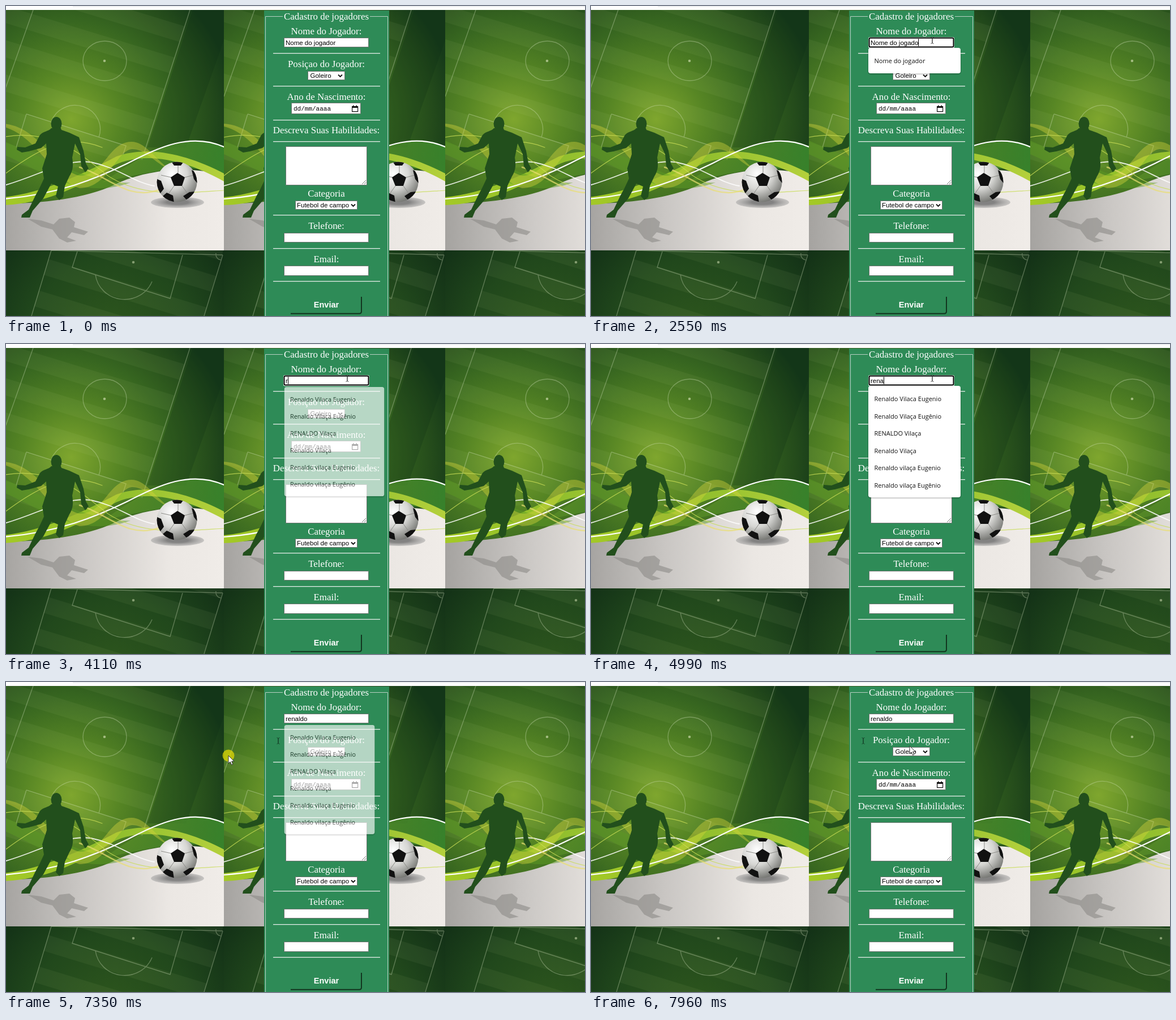
Animation of 1023 by 548 pixels, one loop 8000 ms. Source, as an HTML page:

```html
<!DOCTYPE html>
<html lang="pt">
<head>
<meta charset="utf-8">
<style>
html, body { margin: 0; width: 100%; height: 100%; overflow: hidden; background: #fff }
svg { display: block }
text { white-space: pre }
.serif { font: 16.9px "Liberation Serif", "Times New Roman", serif; fill: #fff; text-anchor: middle }
.sans { font: 11.5px "Liberation Sans", Arial, sans-serif }
.menu { font: 11px "Open Sans", "Noto Sans", sans-serif; fill: #111 }
.box { fill: #fff; stroke: #6f7672 }
.chalk { fill: none; stroke: #dfeccb; stroke-opacity: .32; stroke-width: 1.4 }
</style>
</head>
<body>
<svg id="stage" width="1023" height="548" viewBox="0 0 1023 548">
<defs>
  <radialGradient id="grass" gradientUnits="userSpaceOnUse" cx="115" cy="200" r="290">
    <stop stop-color="#7fa62e"/><stop offset=".3" stop-color="#568524"/>
    <stop offset=".6" stop-color="#376620"/><stop offset=".85" stop-color="#244b1b"/><stop offset="1" stop-color="#163a19"/>
  </radialGradient>
  <radialGradient id="night" gradientUnits="userSpaceOnUse" cx="185" cy="590" r="260">
    <stop stop-color="#2f581d"/><stop offset=".55" stop-color="#21481c"/><stop offset="1" stop-color="#112e16"/>
  </radialGradient>
  <linearGradient id="floor">
    <stop stop-color="#a5a3a0"/><stop offset=".35" stop-color="#c9c6c3"/><stop offset=".75" stop-color="#ebe7e3"/><stop offset="1" stop-color="#f0ece8"/>
  </linearGradient>
  <linearGradient id="lime">
    <stop stop-color="#a4c926"/><stop offset=".5" stop-color="#8fbe2c"/><stop offset="1" stop-color="#b4d03c"/>
  </linearGradient>
  <linearGradient id="leaf">
    <stop stop-color="#6da52c" stop-opacity=".3"/><stop offset="1" stop-color="#37812b"/>
  </linearGradient>
  <radialGradient id="shine" cx=".38" cy=".3" r=".75">
    <stop stop-color="#fff"/><stop offset=".5" stop-color="#d6d6d3"/><stop offset="1" stop-color="#6f706c"/>
  </radialGradient>
  <radialGradient id="shade"><stop offset=".4" stop-color="#777" stop-opacity=".9"/><stop offset="1" stop-color="#999" stop-opacity=".45"/></radialGradient>
  <pattern id="mow" width="60" height="58" patternUnits="userSpaceOnUse" patternTransform="rotate(17)">
    <rect width="60" height="29" fill="#d8f0a0" opacity=".055"/>
  </pattern>
  <clipPath id="round"><circle cx="302" cy="311" r="35.5"/></clipPath>

  <symbol id="tile" viewBox="-6 7 391 541">
    <path fill="url(#grass)" d="M-6 7H385V432H-6Z"/>
    <path fill="url(#mow)" d="M-6 7H325L240 272L-6 300Z"/>
    <path fill="#0c2a14" opacity=".22" d="M330 7H385V60L318 250H250Z"/>
    <g class="chalk">
      <path d="M325 7L240 272M48 7L-6 160M36 191L212 247L203 275M36 191L18 250M80 204A44 42 0 0 1 164 232"/>
      <ellipse cx="174.500" cy="97" rx="38.500" ry="35"/>
    </g>
    <circle cx="174" cy="97" r="2.300" fill="#c9d9a8" opacity=".7"/>

    <path fill="url(#floor)" d="M-6 350C80 348 150 338 200 312C260 286 330 285 385 298V432H-6Z"/>
    <path fill="url(#leaf)" d="M170 312C230 272 280 238 340 238C360 238 375 243 385 248V298C330 276 270 290 170 312Z"/>
    <path fill="url(#lime)" d="M-6 352C60 350 120 326 180 288C225 258 300 262 385 310V296C320 262 250 246 195 266C130 300 60 332 -6 338Z"/>
    <path fill="#5d9a25" opacity=".5" d="M-6 262C60 290 130 345 220 312C160 316 80 275 -6 238Z"/>
    <path fill="#d8d53c" opacity=".4" d="M-6 208C60 212 85 290 130 300C175 300 180 240 222 240C245 240 262 268 290 290C260 275 245 252 222 253C195 256 180 322 130 322C85 310 55 228 -6 213Z"/>
    <g fill="none" stroke-linecap="round">
      <path stroke="#fff" stroke-width="2.200" d="M-6 341C90 334 160 305 215 278C270 250 325 223 385 249"/>
      <path stroke="#fff" stroke-width="1.800" opacity=".85" d="M-6 318C60 300 100 270 150 276C200 286 225 312 262 318"/>
      <path stroke="#c9dc55" stroke-width="1.200" opacity=".8" d="M-6 232C80 215 130 260 180 300C240 340 320 330 385 326M-6 300C60 250 110 225 170 250"/>
      <path stroke="#eadf72" stroke-width="2.500" opacity=".7" d="M130 285C180 300 215 345 270 325"/>
    </g>

    <path fill="#8d8b88" opacity=".6" d="M38 376L62 379L84 386L94 376L112 374L122 382L120 391L145 399L138 405L116 400L108 409L124 415L108 418L94 411L82 395L62 390Z"/>
    <g fill="#224f1c">
      <ellipse cx="89" cy="208" rx="9.500" ry="12"/>
      <path d="M80 216C75 222 66 221 60 228L52 243L34 250L20 249L19 254L28 259L40 257L62 251L71 243L72 262L64 287L67 305C61 319 56 328 52 335L40 360L28 369L27 374L42 374L47 362L66 340L80 314L92 319L88 336L94 343L101 338L104 318L112 301C119 290 119 280 117 268L122 243L131 262L133 283L140 294L146 287L141 278L137 256L129 232L112 224L98 219L96 214Z"/>
    </g>

    <ellipse cx="303" cy="347" rx="47" ry="10" fill="url(#shade)"/>
    <circle cx="302" cy="311" r="35.500" fill="url(#shine)"/>
    <g clip-path="url(#round)">
      <path fill="none" stroke="#8b8b87" d="M304 295V280M316 303L331 299M311 318L321 332M297 318L287 332M292 303L274 299"/>
      <path fill="#111" d="M303 295L316 303L311 318L297 318L291 303ZM292 275H314L309 282H297ZM328 290L340 296V316L332 306ZM267 306L274 309L279 323L272 332L264 320ZM284 330L295 335L297 348H284L277 336ZM313 336L324 329L334 328L322 346Z"/>
    </g>

    <path fill="url(#night)" d="M-6 432H385V548H-6Z"/>
    <path fill="url(#mow)" d="M80 432H384L350 548H45Z"/>
    <g class="chalk">
      <path d="M80 432L45 548M383 440L350 548M80 432L383 440M126 434L117 462L290 517L312 440M158 475A52 50 0 0 0 258 487M371 437A10 10 0 0 0 381 449"/>
    </g>
    <circle cx="225" cy="453" r="2.300" fill="#a9bd92" opacity=".7"/>
  </symbol>
</defs>

<rect width="1023" height="548" fill="#fff"/>
<rect x="118" width="905" height="2" fill="#eff1f2"/>
<use href="#tile" x="-6" y="7" width="391" height="541"/>
<use href="#tile" x="385" y="7" width="391" height="541"/>
<use href="#tile" x="776" y="7" width="391" height="541"/>

<rect x="456" y="8" width="221" height="540" fill="#2e8b57"/>
<path fill="none" stroke="#b9cfc3" d="M489 18.500H458.500V548M643 18.500H674.500V548"/>
<g id="labels" class="serif"></g>
<g id="rules" fill="#e3ece7"></g>
<g class="box">
  <path d="M491.500 401.500h149v16h-149zM491.500 459.500h149v17h-149zM533.500 115.500h65v15h-65zM504.500 171.500h122v19h-122zM511.500 344.500h109v15h-109zM494.500 248.500h143v68h-143z"/>
</g>
<g class="sans">
  <text x="537.500" y="127">Goleiro</text>
  <text x="514" y="356">Futebol de campo</text>
</g>
<text x="508" y="185" style="font:11px 'Liberation Mono','DejaVu Sans Mono',monospace">dd/mm/aaaa</text>
<path fill="none" stroke="#111" stroke-width="1.800" d="M587 121.500l3.500 3.500l3.500-3.500M610 350.500l3.500 3.500l3.500-3.500"/>
<path fill="none" stroke="#111" stroke-width="1.200" d="M611.600 177.600h10v9h-10z"/>
<path fill="#111" d="M611 177h11v3h-11zM613 175.500h1.500v2h-1.500zM618.500 175.500h1.500v2h-1.500z"/>
<path stroke="#666" stroke-width=".9" d="M629 315l7-7M633 315l3-3"/>
<path fill="none" stroke="#12351f" stroke-width="2" d="M503 543.800H624Q628 543.800 628 540V514"/>
<text x="566" y="533" text-anchor="middle" fill="#fff" style="font:bold 14.500px 'Liberation Sans',Arial,sans-serif">Enviar</text>

<rect id="ring" x="490" y="55" width="152" height="19.500" rx="3" fill="#fff"/>
<rect id="field" class="box" x="491.500" y="56.500" width="149" height="16"/>
<text id="value" class="sans" x="494" y="69"></text>
<path id="caret" stroke="#000" d="M0 58V71"/>

<g id="popup">
  <rect id="shadow" x="489" y="75" rx="5" fill="#000" opacity=".16"/>
  <rect id="sheet" x="490" y="74" rx="4" fill="#fff"/>
  <rect id="hover" x="490" y="81" width="163" height="31" fill="#e8e8e8"/>
  <g id="items" class="menu"></g>
</g>

<g fill="none" stroke="#111">
  <path id="trace" d="M-2.500-5.500q2.500 0 2.500 2v7q0 2-2.500 2M2.500-5.500q-2.500 0-2.500 2v7q0 2 2.500 2" transform="translate(481 104)" stroke="#0d2a1a" opacity=".7"/>
</g>
<circle id="click" r="10.500" fill="#eee000" opacity=".68"/>
<path id="beam" d="M-2.500-5.500q2.500 0 2.500 2v7q0 2-2.500 2M2.500-5.500q-2.500 0-2.500 2v7q0 2 2.500 2" fill="none" stroke="#222" stroke-width=".8"/>
<path id="arrow" d="M0 0V14L3.200 11L5.400 16.300L7.800 15.300L5.600 10.200H10Z" fill="#fff" stroke="#222" stroke-width=".9"/>
</svg>

<script>
const LOOP = 8000;
const $ = id => document.getElementById(id);
const set = (id, attrs) => { for (const k in attrs) $(id).setAttribute(k, attrs[k]); };
const show = (id, on) => { $(id).style.display = on ? '' : 'none'; };
const within = (t, a, b) => t >= a && t < b;
const clamp = v => Math.max(0, Math.min(1, v));

[['Cadastro de jogadores', 24], ['Nome do Jogador:', 50], ['Posiçao do Jogador:', 108],
 ['Ano de Nascimento:', 166], ['Descreva Suas Habilidades:', 225], ['Categoria', 337],
 ['Telefone:', 394], ['Email:', 453]].forEach(([s, y]) =>
  $('labels').innerHTML += `<text x="566" y="${y}">${s}</text>`);
[83, 141, 201, 239, 369, 428, 486].forEach(y =>
  $('rules').innerHTML += `<rect x="472" y="${y}" width="189" height="1.300"/>`);

const PROMPT = 'Nome do jogador', TYPED = 'renaldo';
const NAMES = ['Renaldo Vilaca Eugenio', 'Renaldo Vilaça Eugênio', 'RENALDO Vilaça',
  'Renaldo Vilaça', 'Renaldo vilaça Eugenio', 'Renaldo vilaça Eugênio'];
const KEYS = [4040, 4170, 4590, 4990, 5250, 5520, 6060];

// Pointer moves: start, end, number of steps, target x and y
const MOVES = [
  [400, 670, 5, 741, 228], [860, 1150, 5, 603, 61], [6540, 6680, 3, 520, 96],
  [6750, 6820, 2, 481, 104], [7070, 7210, 3, 393, 130], [7420, 7810, 6, 557, 106],
  [7890, 7960, 2, 563, 113]];

function pointer(t) {
  let x = 1030, y = 628;
  for (const [a, b, n, tx, ty] of MOVES) {
    if (t < a) break;
    const k = Math.min(1, (Math.floor((t - a) / (b - a) * (n - 1) + .01) + 1) / n);
    x += (tx - x) * k;
    y += (ty - y) * k;
  }
  return [x, y];
}

function fieldText(t) {
  if (t < 2290) return PROMPT;
  if (t < 2750) return PROMPT.slice(0, 14);
  if (t < 4040) return PROMPT.slice(0, Math.max(0, 12 - 2 * Math.floor((t - 2750) / 70)));
  if (within(t, 6610, 6820)) return NAMES[0];
  return TYPED.slice(0, KEYS.filter(k => t >= k).length);
}

function caretOn(t) {
  return within(t, 1550, 2020) || within(t, 2550, 3060) || within(t, 3640, 5990) ||
    within(t, 6060, 6540) || within(t, 6820, 7280);
}

function popupAlpha(t) {
  if (t < 2290) return 0;
  if (t < 3240) return clamp((t - 2230) / 120);
  if (t < 3380) return clamp(1 - (t - 3205) / 160);
  if (t < 4040) return 0;
  if (t < 7280) return clamp((t - 3980) / 200);
  return clamp(1 - (t - 7280) / 200);
}

let shown = '';
function fillMenu(list) {
  if (shown === list.join()) return;
  shown = list.join();
  $('items').innerHTML = list.map((s, i) => `<text x="500.500" y="${101 + i * 30.5}">${s}</text>`).join('');
}

function draw(t) {
  const focus = within(t, 1550, 7280), preview = within(t, 6610, 6820);
  show('ring', focus);
  set('field', {
    rx: focus ? 2 : 0,
    style: focus ? `stroke:#000;stroke-width:2;fill:${preview ? '#e8f0fe' : '#fff'}` : ''
  });
  $('value').textContent = fieldText(t);
  show('caret', caretOn(t));
  const end = 494.5 + Math.round($('value').getComputedTextLength());
  set('caret', { transform: `translate(${end} 0)` });

  const alpha = popupAlpha(t), first = t < 4000;
  const w = within(t, 4040, 4990) ? 180 : 163, h = first ? 45 : 197;
  const s = 1 - .057 * (1 - alpha), cx = 490 + w / 2, cy = 74 + h / 2;
  show('popup', alpha > 0);
  fillMenu(first ? [PROMPT] : NAMES);
  set('sheet', { width: w, height: h });
  set('shadow', { width: w + 2, height: h + 1.5 });
  set('popup', { opacity: alpha, transform: `translate(${cx} ${cy}) scale(${s}) translate(${-cx} ${-cy})` });
  show('hover', preview);

  const [x, y] = pointer(t);
  const beam = within(t, 1150, 6540) || within(t, 6820, 7070);
  show('beam', beam);
  show('arrow', t >= 400 && !beam);
  show('trace', t >= 7070);
  const at = `translate(${x} ${y})`;
  set('beam', { transform: at });
  set('arrow', { transform: at });
  show('click', within(t, 1340, 1550) || within(t, 7280, 7420));
  set('click', { cx: beam ? x - 2 : x, cy: beam ? y - 3 : y });
}

const start = performance.now();
function frame() {
  draw((performance.now() - start) % LOOP);
  requestAnimationFrame(frame);
}
frame();
</script>
</body>
</html>
```
